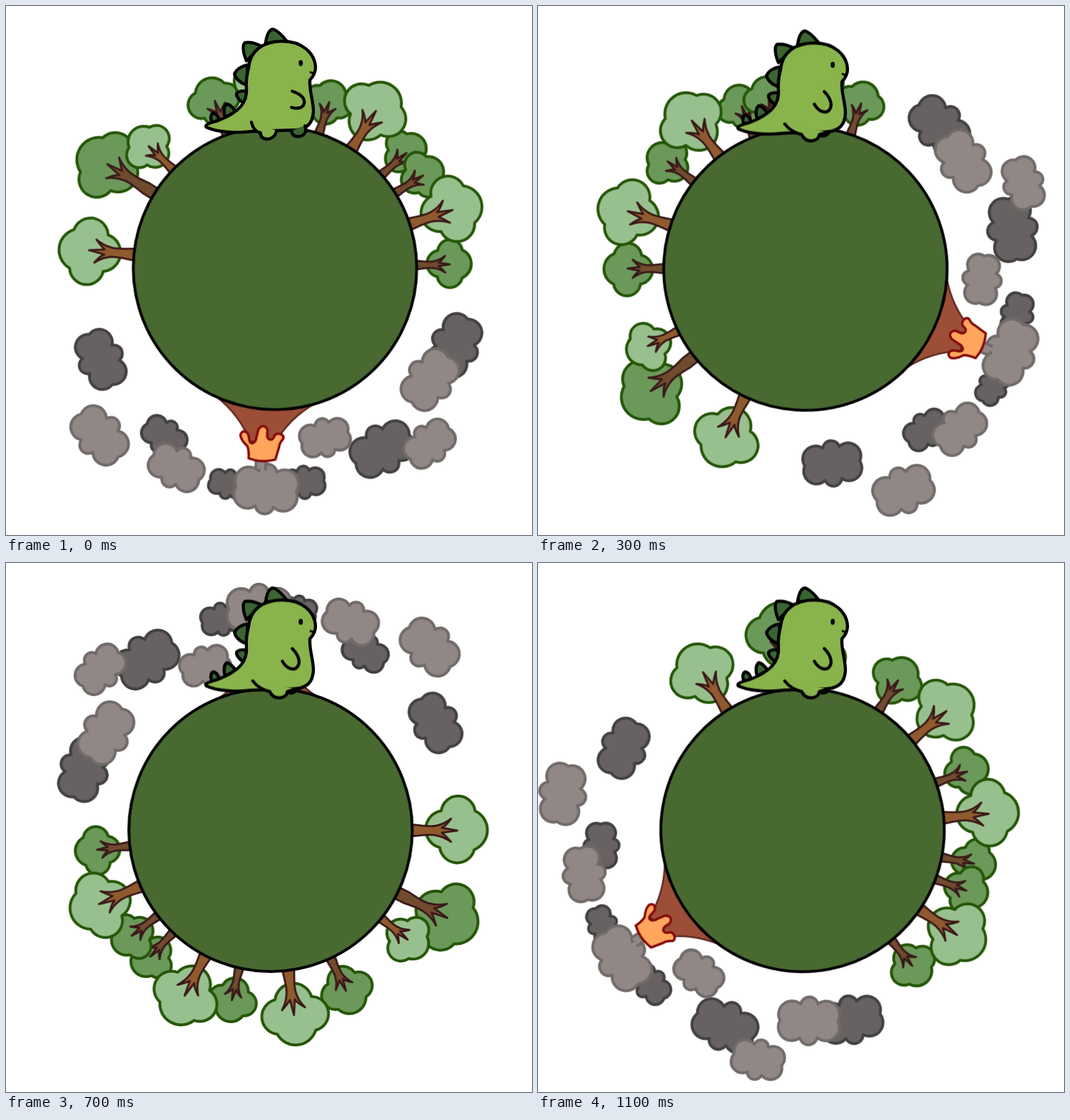
An HTML page that plays this animation: 746x751 px, repeating every 1.2 s.

```html
<!DOCTYPE html>
<html lang="en">
<head>
<meta charset="utf-8">
<title>Little dinosaur planet</title>
<style>
html, body { margin: 0; width: 100%; height: 100%; overflow: hidden; background: #fff; }
svg { display: block; width: 746px; height: 751px; stroke-linejoin: round; stroke-linecap: round; }
path { vector-effect: non-scaling-stroke; }

/* One step per 100 ms; the turn speeds up halfway */
#world { animation: spin 1.2s infinite; }
@keyframes spin {
  0% { transform: translate(381.5px, 372px) rotate(185.3deg); animation-timing-function: steps(2); }
  16.667% { transform: translate(380px, 372px) rotate(142.3deg); animation-timing-function: steps(2); }
  33.333% { transform: translate(378.5px, 374px) rotate(88deg); animation-timing-function: steps(1); }
  41.667% { transform: translate(376.5px, 375.5px) rotate(63.3deg); animation-timing-function: steps(2); }
  58.333% { transform: translate(375.2px, 379px) rotate(0deg); animation-timing-function: steps(4); }
  91.667%, 100% { transform: translate(375.2px, 379.2px) rotate(-122.4deg); }
}

/* The walk: A, C, B, C */
#dino { animation: bob 0.2s step-end infinite; }
#poseA, #poseB { animation: quarter 0.4s step-end infinite; }
#poseB { animation-delay: -0.2s; }
#poseC { animation: half 0.2s step-end infinite; }
@keyframes bob { 0% { transform: none; } 50%, 100% { transform: translateY(2.5px); } }
@keyframes quarter { 0% { opacity: 1; } 25%, 100% { opacity: 0; } }
@keyframes half { 0% { opacity: 0; } 50%, 100% { opacity: 1; } }
#poseB { animation-name: quarterB; animation-delay: 0s; }
@keyframes quarterB { 0% { opacity: 0; } 50% { opacity: 1; } 75%, 100% { opacity: 0; } }

.smoke { fill: #918785; stroke: #706b6a; stroke-width: 4; }
.smoke.dark { fill: #676161; stroke: #424040; }
.crown { fill: #98c08e; stroke: #245606; stroke-width: 4; }
.dark .crown { fill: #6b995a; }
.trunk { fill: #8f5a2d; stroke: #3a181a; stroke-width: 2.8; }
.dark .trunk { fill: #704b2e; }
.rock { fill: #9c4e36; stroke: #5a2a20; stroke-width: 2.5; }
.lava { fill: #ffa65c; stroke: #850c0c; stroke-width: 3.5; }
.planet { fill: #486930; stroke: #000; stroke-width: 4; }
#dino { fill: #89b34b; stroke: #000; stroke-width: 4.4; }
#dino .shade { fill: #3a6531; }
#dino .line { fill: none; }
</style>
</head>
<body>
<svg viewBox="0 0 746 751">
  <g id="world">
    <g id="smoke"></g>
    <g transform="rotate(-1.2)">
      <path class="smoke" d="M-7 -286V-265H7V-286"/>
      <path class="rock" d="M-70 -188C-48 -203 -30 -222 -18 -248H18C30 -222 48 -203 70 -188Z"/>
      <path class="lava" d="M18 -272Q18 -262 21 -255Q31 -247 32 -240Q31 -233 24 -235Q20 -238 19 -246Q17 -252 13 -250Q9 -247 9 -241L7 -230Q4 -225 0 -225Q-5 -226 -6 -231V-239Q-8 -245 -13 -243Q-15 -242 -17 -236Q-21 -233 -26 -235Q-30 -237 -29 -241Q-24 -247 -24 -253L-20 -271Q0 -278 18 -272Z"/>
    </g>
    <g id="trees"></g>
    <circle class="planet" r="201"/>
  </g>
  <g id="dino">
    <path class="shade" d="M368 53C370 40 374 33 379 33C386 35 393 43 400 52ZM341 78C336 66 335 55 339 52C347 51 355 53 362 57ZM341 112C331 109 325 102 324 96C327 90 334 85 343 84ZM340 140C332 135 326 130 327 124C330 121 336 120 341 121ZM311 158C308 150 309 142 313 139C318 140 322 144 326 150ZM292 165C289 158 291 153 294 152C298 153 301 156 302 162Z"/>
    <path d="M344 88C346 64 364 50 392 50C419 50 438 66 439 87C439 94 437 99 431 105C430 122 436 134 436 150C435 167 427 174 412 176L349 178C325 181 299 179 284 172C281 168 290 166 300 163C329 152 343 138 341 116C340 104 342 96 344 88Z"/>
    <ellipse cx="418" cy="81" rx="3" ry="4.2" fill="#000" stroke="none"/>
    <path class="line" stroke-width="3" d="M432 94Q434 96 438 94"/>
    <g id="poseA">
      <path class="shade" d="M405 177C405 184 411 186 417 185C424 183 427 178 424 170"/>
      <path d="M348 165C350 173 355 179 361 180Q361 189 371 189Q381 188 384 177"/>
      <path class="line" d="M406 121C418 125 424 130 423 138C421 146 412 146 405 144"/>
    </g>
    <g id="poseB">
      <path class="shade" d="M369 179C369 186 374 189 380 188C386 188 390 185 390 180"/>
      <path d="M350 167C355 174 364 178 376 179L393 181Q395 188 405 188Q418 187 417 180L414 173"/>
      <path class="line" d="M385 139C388 149 395 155 402 153C411 150 411 140 406 125"/>
    </g>
    <g id="poseC">
      <path class="shade" d="M399 180C402 184 411 182 413 176"/>
      <path d="M350 165C356 173 366 178 374 180Q378 189 388 189Q398 188 399 180L411 176"/>
      <path class="line" d="M406 119C416 129 419 141 411 147C405 150 397 146 392 137"/>
    </g>
  </g>
</svg>
<script>
const put = (id, markup) => document.getElementById(id).insertAdjacentHTML('beforeend', markup);

// Stands something upright on a circle of radius r, at an angle in degrees
const place = (angle, r) => `rotate(${angle + 90}) translate(0 ${-r})`;

// A puff is six round lobes: two at each end and one on each long side
function puffPath(w) {
  const h = w * 0.7;
  const side = [[0.45, 0.03], [0.12, 0.38], [-0.15, 0.37]];
  const notches = [...side, ...side.map(([x, y]) => [-x, -y])].map(([x, y]) => [x * w, y * h]);
  let [px, py] = notches[5];
  let d = `M${px} ${py}`;
  for (const [x, y] of notches) {
    const r = Math.hypot(x - px, y - py) * 0.51;
    d += `A${r} ${r} 0 0 1 ${x} ${y}`;
    [px, py] = [x, y];
  }
  return d + 'Z';
}

// Each puff: angle, distance, width
function addSmoke(kind, puffs) {
  for (const [angle, r, w] of puffs) {
    put('smoke', `<path class="smoke ${kind}" transform="${place(angle, r)}" d="${puffPath(w)}"/>`);
  }
}

addSmoke('dark', [
  [-162, 278, 92], [-126, 299, 95], [-103, 307, 62], [-83, 314, 56], [-62, 286, 67], [-33, 279, 87]
]);
addSmoke('light', [
  [-149.5, 271, 91], [-136.6, 332, 77], [-111.7, 251, 74], [-93, 314, 95], [-69, 316, 81], [-49, 344, 89]
]);

const crown = 'M-28 -86A30 30 0 0 1 27 -85A25 25 0 0 1 24 -36A26.6 26.6 0 0 1 -28 -38A24.2 24.2 0 0 1 -28 -86Z';
const trunk = 'M-8 30V0C-6 -15 -5 -24 -7 -31Q-9 -42 -17 -52Q-7 -45 -4 -39L0 -61L3 -39Q8 -45 16 -52Q9 -42 7 -31C5 -24 6 -15 8 0V30Z';

// Each tree: angle, then its scale and extra height where unusual
function addTrees(kind, usual, list) {
  for (const [angle, scale = usual, lift = 0] of list) {
    put('trees', `<g class="${kind}" transform="${place(angle, 204 + lift)} scale(${scale})">
      <path class="crown" d="${crown}"/><path class="trunk" d="${trunk}"/></g>`);
  }
}

addTrees('dark', 0.72, [[133.5], [142.7], [102.8], [64.9, 0.79], [173.5], [26.5, 1.05, 12]]);
addTrees('light', 1, [[0.2], [38.7, 0.74], [82.8], [117.4], [156.6]]);
</script>
</body>
</html>
```
